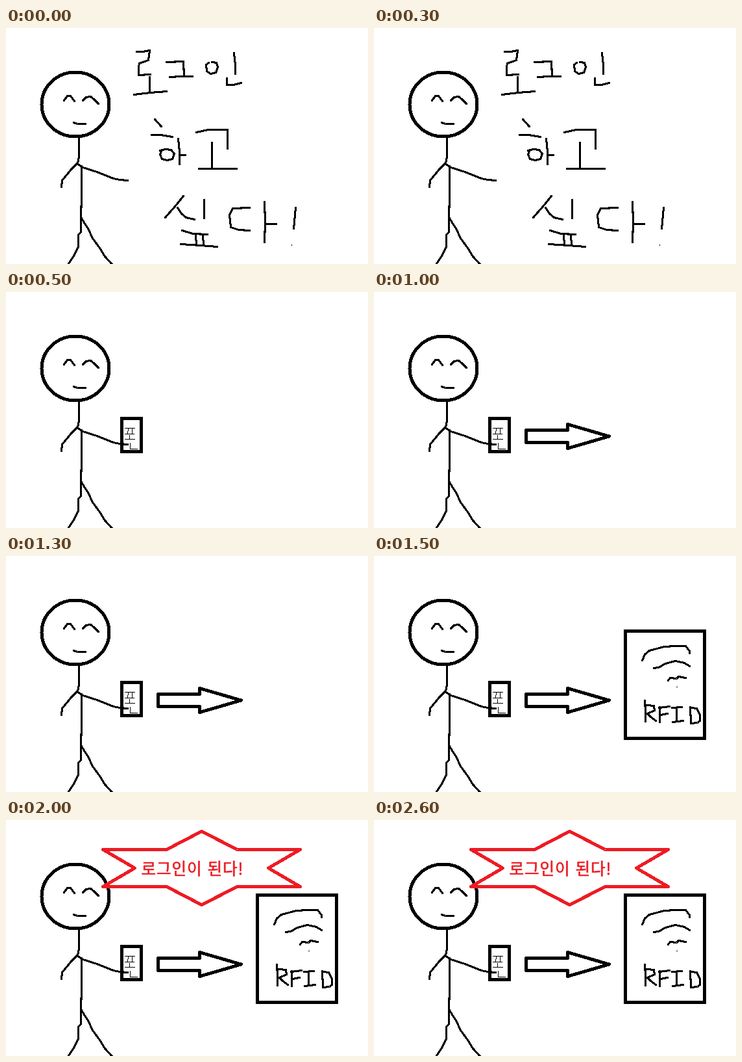
An HTML page for the animation above (3000 ms loop, 558x363 px).

```html
<!DOCTYPE html>
<html lang="ko">
<head>
<meta charset="utf-8">
<style>
  html, body { margin: 0; width: 100%; height: 100%; overflow: hidden; background: #fff; }
  svg { display: block; width: 558px; height: 363px; }
  path, ellipse { fill: none; stroke: #000; stroke-width: 3.1; stroke-linecap: round; stroke-linejoin: round; shape-rendering: crispEdges; }
  .thick { stroke-width: 5; stroke-linejoin: miter; }
  .outline { stroke-width: 5; }
  .thin { stroke-width: 1; }
  .star { stroke: #ed1c24; }
  text { font: 400 24.5px "Noto Sans CJK KR", "Noto Sans CJK", "Noto Sans CJK JP", sans-serif; letter-spacing: 1px; fill: #ed1c24; stroke: #ed1c24; stroke-width: .7px; }
</style>
</head>
<body>
<svg viewBox="0 0 558 363">
  <g id="wish" transform="translate(.5 .5)">
    <!-- 로그인 -->
    <path d="M201 36L210 36L221 34L219 49L205 54L204 59L204 72L222 71M221 75L221 97M197 102L222 99L247 97
      M247 52L273 51L274 74M252 75L270 74L287 74
      M312 53L308 56L309 66L315 70L323 68L326 60L324 53L317 52M351 38L353 56L353 70M340 77L340 87L350 87L362 84"/>
    <!-- 하고 -->
    <path d="M229 140L239 151M224 164L238 164L256 167
      M240 187L237 194L240 201L248 203L256 201L259 193L254 187L245 186L237 188M265 170L267 190L267 209M267 195L276 195
      M293 160L311 156L341 156L341 185M317 176L317 214M297 216L355 216"/>
    <!-- 싶다! -->
    <path d="M273 258L260 274L245 291M264 276L270 285L277 291L290 294M305 264L305 292
      M271 311L288 316L310 317M292 319L293 332M303 319L304 333M269 332L300 334L325 336
      M375 276L349 277L344 287L346 306L358 310L375 311M398 267L399 298L398 329M400 301L416 301
      M446 276L443 308"/>
    <path d="M440 333.5h.1" style="stroke-width:2"/>
  </g>

  <g id="phone">
    <path class="thick" d="M178.5 194.5H208.5V245.5H178.5Z"/>
    <path class="thin" d="M183 209.5H199M188.5 210L187.5 218M194.5 210V218M183 218.5H198M190.5 220V226M183 226.5H199M191.5 232V241.5H203"/>
  </g>

  <g id="person">
    <ellipse class="outline" cx="107" cy="117.5" rx="52" ry="49.5"/>
    <path transform="translate(.5 .5)" d="M89 111L94 104L99 104L105 112M118 111L123 106L130 105L136 110L142 116M104 145L109 147L122 147
      M112 168L112 198L110 207L100 217L86 234L85 244
      M109 208L118 214L140 221L165 231L175 233L187 234
      M116 212L116 260L115 290L115 313L111 318L111 336L104 350L96 362
      M115 290L120 299L126 308L133 323L144 338L152 351L163 363"/>
  </g>

  <path id="arrow" class="outline" d="M234.5 212.5H298.5V203.5L362.5 222L298.5 240.5V231.5H234.5Z"/>

  <g id="card">
    <path class="thick" d="M387.5 115.5H509.5V280.5H387.5Z"/>
    <g transform="translate(.5 .5)">
      <path d="M413 160L417 151L424 145L447 139L465 138L480 138L486 146L486 149
        M431 172L438 171L449 165L464 161L478 164L486 169
        M453 191L456 187L466 188L469 185L480 187"/>
      <path class="thin" d="M466 201h1"/>
      <!-- RFID -->
      <path d="M417 222L418 238L418 254M420 229L431 230L432 237L421 242L426 247L434 253
        M440 232L440 255M439 233L455 231M441 244L452 242
        M459 233L474 232M466 234L466 254M460 255L476 253
        M487 232L488 256M488 233L497 234L502 244L502 253L498 256L488 257"/>
    </g>
  </g>

  <g id="result">
    <path class="outline star" d="M149.5 45.5H247.5L301.5 17.5L356.5 45.5H453.5L404.5 74L453.5 102.5H356.5L301.5 130.5L247.5 102.5H149.5L198.5 74Z"/>
    <text x="208.5" y="84">로그인이 된다!</text>
  </g>
</svg>
<script>
  const LOOP = 3000;
  // Each part: id, shown from, hidden at (ms)
  const parts = [
    ["wish", 0, 500],
    ["phone", 500, LOOP],
    ["arrow", 1000, LOOP],
    ["card", 1500, LOOP],
    ["result", 2000, LOOP]
  ].map(([id, from, to]) => ({ el: document.getElementById(id), from, to }));

  const start = performance.now();

  function draw() {
    const t = Math.max(0, performance.now() - start) % LOOP;
    for (const { el, from, to } of parts) {
      el.style.visibility = t >= from && t < to ? "visible" : "hidden";
    }
    requestAnimationFrame(draw);
  }
  draw();
</script>
</body>
</html>
```
